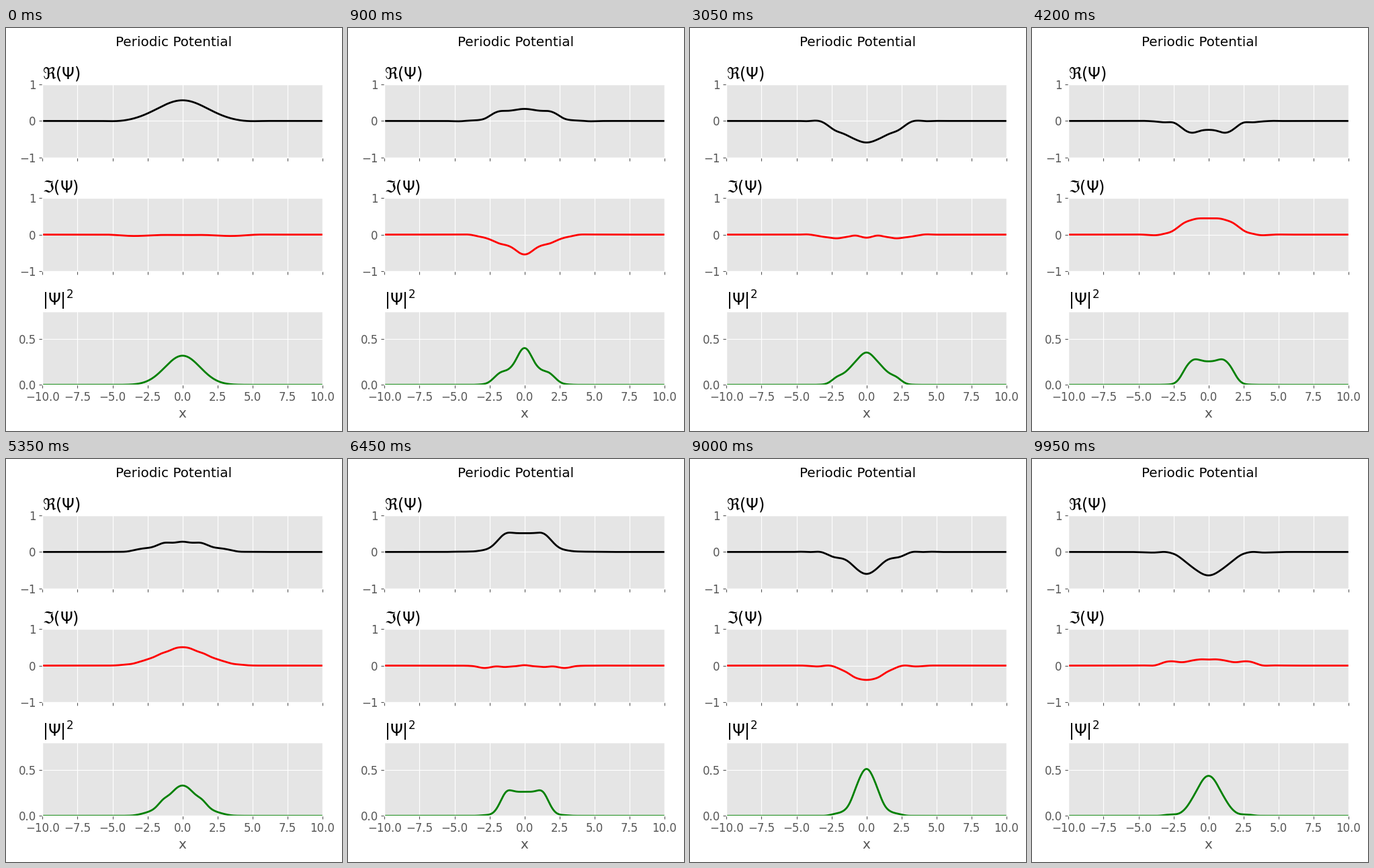
Recreate the animation shown at these times as a matplotlib script. Size 500x600 px, loop 10 s.

```python
import numpy as np
import matplotlib.pyplot as plt
from matplotlib.animation import FuncAnimation

WIDTH, HEIGHT, DPI = 500, 600, 100
FRAMES, INTERVAL = 200, 50
GREY = "#555555"

plt.rcParams.update({
    "font.family": "DejaVu Sans",
    "font.size": 12,
    "mathtext.fontset": "dejavusans",
    "figure.titlesize": "large",
    "axes.titlesize": "x-large",
    "axes.labelsize": "large",
    "axes.facecolor": "#E5E5E5",
    "axes.edgecolor": "white",
    "axes.linewidth": 1,
    "axes.grid": True,
    "axes.axisbelow": True,
    "axes.labelcolor": GREY,
    "grid.color": "white",
    "grid.linestyle": "-",
    "grid.linewidth": 0.8,
    "xtick.color": GREY,
    "ytick.color": GREY,
    "lines.linewidth": 2,
})

# Wave packet in a quartic well, solved through the energy eigenstates
STRENGTH = 0.025
PACKET = 0.16
T_START, T_STEP = 0.15, 0.25

x = np.linspace(-10, 10, 401)
h = x[1] - x[0]
hop = np.full(x.size - 1, -0.5 / h**2)
hamiltonian = (np.diag(1 / h**2 + STRENGTH * x**4)
               + np.diag(hop, 1) + np.diag(hop, -1))
energies, states = np.linalg.eigh(hamiltonian)
packet = (2 * PACKET / np.pi) ** 0.25 * np.exp(-PACKET * x**2)
weights = states.T @ packet


def psi(i):
    t = T_START + T_STEP * i
    return states @ (weights * np.exp(-1j * energies * t))


fig = plt.figure(figsize=(WIDTH / DPI, HEIGHT / DPI), dpi=DPI,
                 facecolor="white")
fig.suptitle("Periodic Potential")


def panel(row, title, color, ylim, yticks):
    left, right, height = 54.38, 471, 109
    bottom = HEIGHT - (83.9 + 169.2 * row + height)
    ax = fig.add_axes([left / WIDTH, bottom / HEIGHT,
                       (right - left) / WIDTH, height / HEIGHT])
    ax.set_title(title, loc="left")
    ax.set_xlim(-10, 10)
    ax.set_ylim(*ylim)
    ax.set_xticks(np.arange(-10, 10.1, 2.5))
    ax.set_yticks(yticks)
    ax.tick_params(labelbottom=row == 2)
    line, = ax.plot(x, np.zeros_like(x), color=color)
    return ax, line


_, real_line = panel(0, r"$\Re(\Psi)$", "black", (-1, 1), [-1, 0, 1])
_, imag_line = panel(1, r"$\Im(\Psi)$", "red", (-1, 1), [-1, 0, 1])
ax, prob_line = panel(2, r"$|\Psi|^2$", "green", (0, 0.8), [0, 0.5])
ax.set_xlabel("x")


def update(i):
    wave = psi(i)
    real_line.set_ydata(wave.real)
    imag_line.set_ydata(wave.imag)
    prob_line.set_ydata(np.abs(wave) ** 2)
    return real_line, imag_line, prob_line


anim = FuncAnimation(fig, update, frames=FRAMES, interval=INTERVAL,
                     repeat=True, repeat_delay=0)
plt.show()
```
